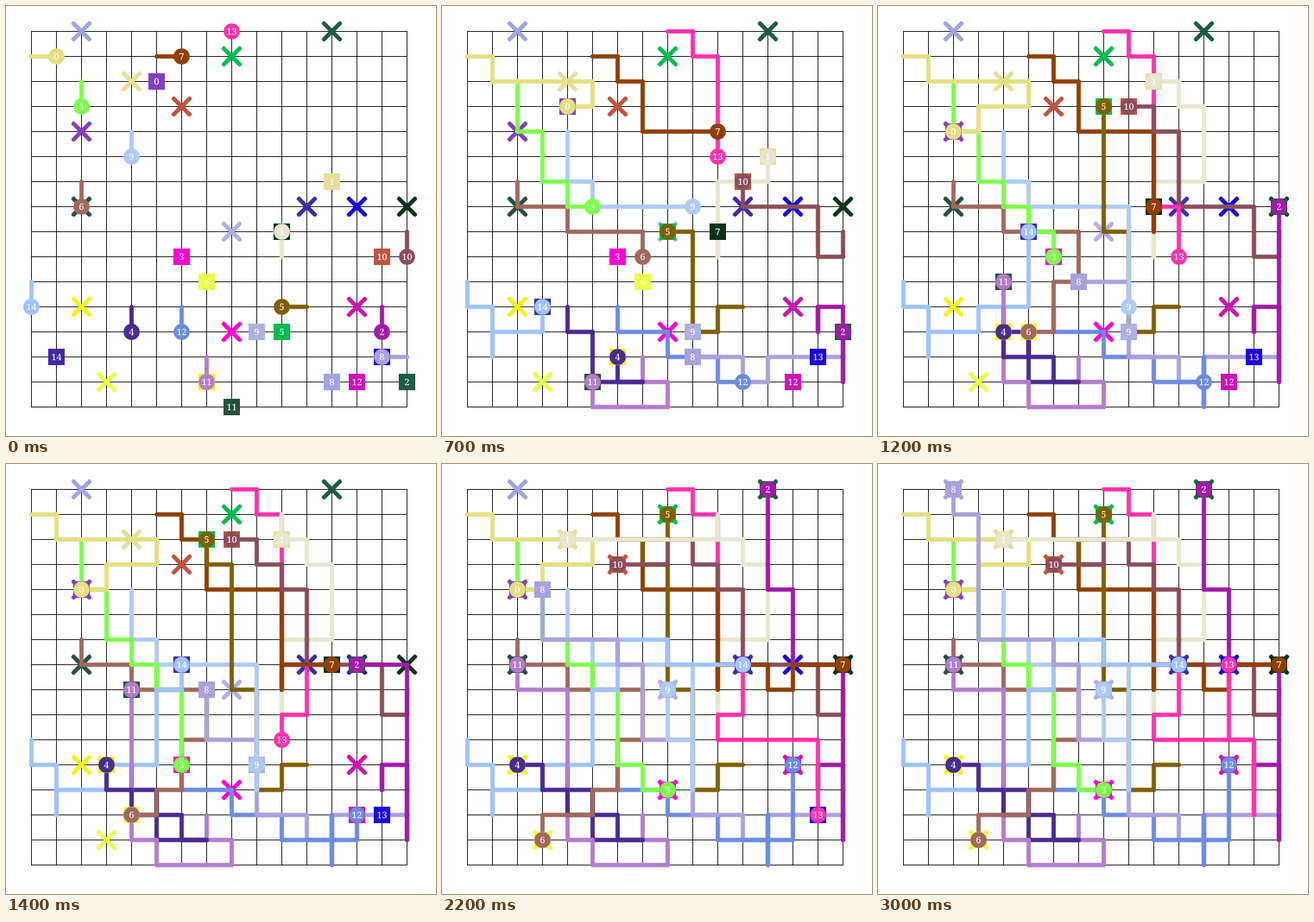
An HTML page with a canvas that plays this animation: 601x601 px, repeating every 3100 ms.

```html
<!DOCTYPE html>
<html lang="en">
<head>
<meta charset="utf-8">
<title>Grid robots</title>
<style>
html, body { margin: 0; width: 100%; height: 100%; overflow: hidden; background: #fff; }
canvas { display: block; }
</style>
</head>
<body>
<canvas id="stage" width="601" height="601"></canvas>
<script>
const CELL = 35, CELLS = 15, STEP = 100, STEPS = 31;
const MOVES = { U: [0, -1], D: [0, 1], L: [-1, 0], R: [1, 0], '.': [0, 0] };

// robot colour, load colour, start, load, goal, moves
const robots = [
  ['#e4df80', '#843fbb', [0, 1], [5, 2], [2, 4], 'RDRRRRDLLDL'],
  ['#e8e6cf', '#e6df99', [10, 9], [12, 6], [4, 2], 'UDUUURRUUULULUDLLLLLL'],
  ['#a11ba8', '#1e5c46', [14, 11], [15, 14], [12, 0], 'DURDDDUUUUUUULLUUULUUUU'],
  ['#7dff4d', '#ff00d0', [2, 2], [6, 9], [8, 12], 'DDRDDRDRDUDRDDDRDR'],
  ['#4a2b8f', '#f3f31a', [4, 11], [7, 14], [2, 11], 'DRDDRRLULUDLULUL'],
  ['#7d6000', '#00bd50', [11, 11], [10, 12], [8, 1], 'LDLUUUULUUUUULURU'],
  ['#9f6a5d', '#ebff4b', [2, 6], [7, 10], [3, 14], 'DRRDRRRDDLDDLDLLD'],
  ['#8f4000', '#08341b', [5, 1], [10, 8], [15, 7], 'RDRDDRRRDDDDURRDRURR'],
  ['#aca1da', '#9fa5e0', [15, 13], [12, 14], [2, 0], 'LLLDLULLUUULLUUULULLLUUUUULU'],
  ['#aecbf5', '#b0b0e0', [4, 4], [9, 12], [8, 8], 'DDRDRRRRD.DDDDUULUU'],
  ['#8a4e5b', '#c05540', [15, 8], [14, 9], [6, 3], 'DLUULLLUUULULULDLL'],
  ['#b47ccb', '#28503e', [7, 13], [8, 15], [2, 7], 'DRD.LLLULUUUUUULLU'],
  ['#6d8ce0', '#d012b6', [6, 11], [13, 14], [13, 11], 'DRRDRRDRRDUUDRUUU'],
  ['#ff33ad', '#1c00dc', [8, 0], [14, 13], [13, 7], '.RDRDDDDDDRDDLDRRRRDDD..UUULUUU'],
  ['#9fc3fd', '#432aa5', [0, 10], [1, 13], [11, 7], 'DRDDURRURRUUURUURRDRRR']
].map(([color, loadColor, start, load, goal, moves]) => {
  const path = [start];
  for (const m of moves.padEnd(STEPS, '.')) {
    const [x, y] = path[path.length - 1], [dx, dy] = MOVES[m];
    path.push([x + dx, y + dy]);
  }
  const pickup = path.findIndex(([x, y]) => x === load[0] && y === load[1]);
  return { color, loadColor, load, goal, path, pickup };
});

const ctx = document.getElementById('stage').getContext('2d');
ctx.lineCap = 'round';
ctx.textAlign = 'center';
ctx.font = '13px "Noto Serif", serif';

const px = c => CELL * (c + 1) + 0.5;

function line(x1, y1, x2, y2, color, width) {
  ctx.strokeStyle = color;
  ctx.lineWidth = width;
  ctx.beginPath();
  ctx.moveTo(x1, y1);
  ctx.lineTo(x2, y2);
  ctx.stroke();
}

function drawGrid() {
  ctx.fillStyle = '#000';
  for (let i = 0; i <= CELLS; i++) {
    const p = CELL * (i + 1);
    ctx.fillRect(p, CELL, 1, CELL * CELLS + 1);
    ctx.fillRect(CELL, p, CELL * CELLS + 1, 1);
  }
}

function drawGoal({ goal, loadColor }) {
  const x = px(goal[0]), y = px(goal[1]), r = 11;
  line(x - r, y - r, x + r, y + r, loadColor, 6);
  line(x - r, y + r, x + r, y - r, loadColor, 6);
}

function drawLabel(text, x, y) {
  ctx.fillStyle = '#fff';
  ctx.fillText(text, x, y + 4.5);
}

function draw(step) {
  ctx.fillStyle = '#fff';
  ctx.fillRect(0, 0, 601, 601);
  drawGrid();
  robots.forEach(drawGoal);

  // later trails cover earlier ones
  for (let s = 1; s <= step; s++) {
    for (const { path, color } of robots) {
      const [a, b] = path[s - 1], [c, d] = path[s];
      if (a !== c || b !== d) line(px(a), px(b), px(c), px(d), color, 6);
    }
  }

  robots.forEach(({ path, load, pickup, loadColor }, id) => {
    const [x, y] = (step >= pickup ? path[step] : load).map(px);
    ctx.fillStyle = loadColor;
    ctx.fillRect(x - 11.5, y - 11.5, 23, 23);
    drawLabel(id, x, y);
  });

  robots.forEach(({ path, color }, id) => {
    const [x, y] = path[step].map(px);
    ctx.fillStyle = color;
    ctx.beginPath();
    ctx.arc(x, y, 11.3, 0, 2 * Math.PI);
    ctx.fill();
    drawLabel(id, x, y);
  });
}

let shown = 0;
const began = performance.now();

function tick() {
  const time = Math.max(0, performance.now() - began);
  const step = Math.floor(time / STEP) % STEPS + 1;
  if (step !== shown) draw(shown = step);
  requestAnimationFrame(tick);
}
tick();
</script>
</body>
</html>
```
